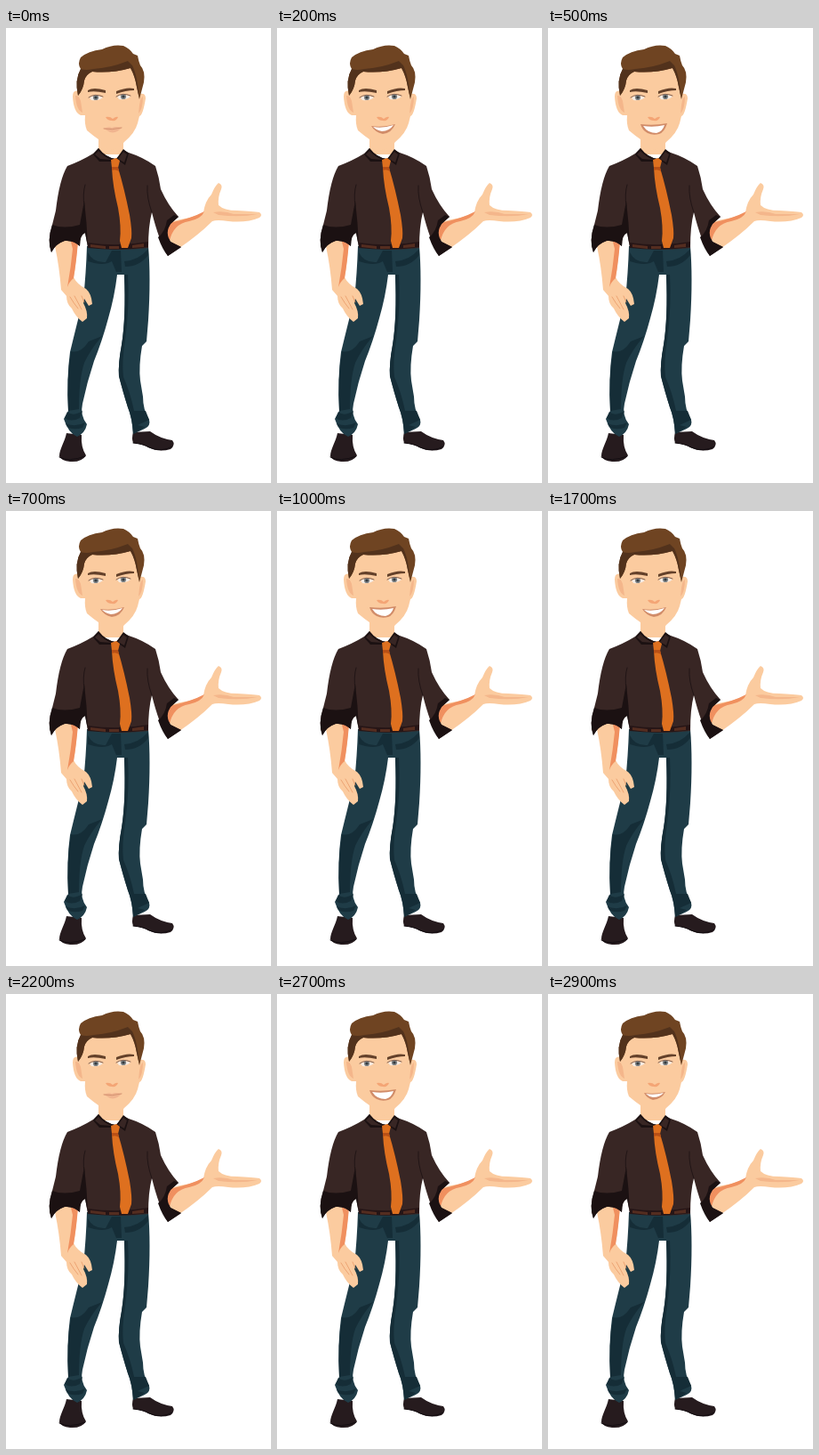
An HTML page that plays this animation: 298x511 px, repeating every 3 s.

```html
<!DOCTYPE html>
<html lang="en">
<head>
<meta charset="utf-8">
<title>Presenter talking</title>
<style>
html, body { margin: 0; width: 100%; height: 100%; overflow: hidden; background: #fff; }
svg { display: block; width: 298px; height: 511px; }
.skin { fill: #fbcb9f; }
.blush { fill: #f4b68b; }
.rim { fill: #f0905f; }
.shirt { fill: #382624; }
.dark { fill: #1b1112; }
.jeans { fill: #1f3c47; }
.shade { fill: #152d37; }
.shoe { fill: #261b1e; }
.hair { fill: #6f4422; }
.lip { fill: #d18c69; }
.teeth { fill: #fff; }
.line { fill: none; stroke-linecap: round; stroke-linejoin: round; }
.mouth { visibility: hidden; }
.mouth.on { visibility: visible; }
</style>
</head>
<body>
<svg viewBox="0 0 298 511">
  <g id="shoes">
    <path class="shoe" d="M68 455C66 465 60 473 60 481Q62 486 72 487Q85 488 90 480Q84 471 85 457Z"/>
    <path class="shoe" d="M143 454Q141 461 143 466Q154 467 160 471Q172 477 185 473Q191 468 187 463Q173 461 162 453Z"/>
    <path class="line" stroke="#120c10" d="M60 482Q70 488 89 481M143 466Q154 467 161 471Q175 477 187 470"/>
  </g>

  <g id="legs">
    <path class="jeans" d="M91 245L160 245Q163 280 160 328L158 352L153 357Q149 380 151 396L154 414Q154 429 161 440Q163 447 156 450L143 456Q142 438 137 426Q131 407 127 391Q126 377 130 356Q135 325 133 277H125Q122 302 115 326Q108 352 99 374Q91 398 86 422Q83 435 91 445Q89 455 80 459Q70 455 65 439L70 430Q68 393 72 364Q80 331 87 304Q90 276 91 245Z"/>
    <path class="shade" d="M92 252Q98 264 112 263L119 250H129L130 274H124L119 262Q110 268 92 262ZM160 255Q150 268 134 268L133 262Q149 261 160 248Z"/>
    <path class="shade" d="M108 346Q95 361 88 376Q82 394 82 428L70 430Q68 393 73 363Q84 366 93 352Z"/>
    <path class="shade" d="M133 277H137Q139 312 134 350Q130 374 132 392Q140 410 144 430L157 430L161 440L148 446L156 448L143 456Q142 438 137 426Q131 407 127 391Q126 377 130 356Q135 325 133 277Z"/>
    <path class="shade" d="M69 431Q75 437 86 430L83 438Q73 443 66 438ZM67 444Q78 449 89 443L86 449Q75 452 69 448Z"/>
  </g>

  <g id="left-arm">
    <path class="skin" d="M54 236L81 236Q79 263 76 280Q80 288 90 293Q96 298 97 310L93 312L88 304L87 309Q92 318 91 326L86 330Q78 324 74 315Q68 310 68 301L62 294Q60 268 55 245Z"/>
    <path class="rim" d="M73 240H81Q79 264 76 281Q71 285 69 291Q73 269 75 248Z"/>
    <path class="line" stroke="#e99a69" stroke-width=".8" d="M72 302Q76 309 81 315M77 301L85 316M85 301L88 308"/>
  </g>

  <g id="right-arm">
    <path class="skin" d="M180 219L196 215Q211 213 222 207Q224 194 231 187Q235 177 239 174Q244 176 242 181Q238 190 239 199Q245 205 260 205Q278 206 285 207Q289 210 285 213Q271 219 250 217Q237 215 232 217Q217 232 195 247Q180 242 180 219Z"/>
    <path class="rim" d="M184 219Q208 214 223 206Q220 214 206 217Q188 220 184 239Q178 230 184 219Z"/>
    <path class="blush" d="M233 207Q245 205 256 209L283 209Q264 213 239 210Z"/>
  </g>

  <path class="skin" d="M104 116H132V142H104Z"/>

  <g id="shirt">
    <path class="shirt" d="M104 135Q112 145 123 147Q130 143 132 137L138 140Q154 145 168 155Q172 167 174 181Q182 199 194 212L185 220Q178 230 185 240L197 246L182 256Q172 239 164 207Q160 222 160 247Q127 251 92 246L89 230Q83 232 83 245Q76 238 66 239Q56 242 51 252Q46 239 52 221L56 205Q60 170 69 155Q85 149 98 141Z"/>
    <path class="dark" d="M52 221Q65 226 83 221L88 194Q91 219 92 246L89 230Q83 232 83 245Q76 238 66 239Q56 242 51 252Q46 239 52 221Z"/>
    <path class="dark" d="M171 235Q179 229 181 216L189 210L194 212L185 220Q178 230 185 240L197 246L182 256Q176 249 171 235Z"/>
    <path class="dark" d="M104 135L98 142L105 150L119 150L123 147Q111 145 104 135ZM132 136L138 141L134 154L124 147Z"/>
    <path class="shirt" d="M104 138L100 142L106 147L119 148Q110 145 104 138ZM132 139L136 142L133 151L126 147Z"/>
    <path class="line" stroke="#211516" d="M88 200Q86 186 89 176M164 207Q158 190 159 177"/>
  </g>

  <g id="belt">
    <path fill="#261516" d="M92 241Q126 246 160 240V246Q127 251 92 247Z"/>
    <path fill="#542d20" d="M95 243L112 245V248L95 246ZM116 245L127 245V248L116 248ZM142 244L155 242V246L142 247Z"/>
  </g>

  <g id="tie">
    <path fill="#de701f" d="M118 148L124 146L128 149L126 157Q133 180 139 210Q142 228 141 236L137 247L130 247L128 239Q130 224 126 202Q120 178 119 157Z"/>
    <path fill="#b95016" d="M119 156H126L127 161Q123 158 119 160Z"/>
  </g>

  <g id="head">
    <path class="skin" d="M82 71Q75 69 75 77Q76 95 84 98L89 98Q88 108 91 115Q98 121 104 125Q111 137 120 137Q128 135 133 128Q145 118 148 107L150 99Q154 98 157 79Q157 73 151 74L144 40L91 42Z"/>
    <path class="blush" d="M78 76Q82 75 84 82L86 95Q79 92 78 76ZM154 77Q151 78 150 87L149 96Q154 91 154 77Z"/>
    <path class="hair" d="M81 76Q77 58 84 46Q80 40 84 33Q92 26 108 24Q120 18 132 20Q139 23 143 29L148 31Q149 37 151 42Q157 48 155 61L150 80L147 66Q145 54 140 45Q119 51 97 49Q90 52 88 59Q87 69 81 76Z"/>
    <path fill="#52321c" d="M84 46Q90 48 98 46Q117 45 137 37L142 42Q148 54 150 80L147 66Q145 54 140 45Q119 51 97 49Q90 52 88 59Q87 69 81 76Q77 58 84 46Z"/>
    <path fill="#64412a" d="M92 70Q98 66 112 70V73Q99 70 92 72ZM124 71Q136 66 144 68V70Q135 70 124 74Z"/>
    <g id="eye">
      <path fill="#f6ece4" d="M94 78Q100 74 109 78Q104 82 96 81Z"/>
      <circle cx="101" cy="78" r="3.1" fill="#7f8588"/>
      <circle cx="101" cy="78" r="1.6" fill="#343a3e"/>
      <path class="line" stroke="#806050" d="M93 78Q100 73 109 77"/>
    </g>
    <use href="#eye" x="31" y="-1"/>
    <path class="rim" opacity=".65" d="M112 100Q117 99 120 102Q124 99 126 100Q124 105 119 104Q114 104 112 100Z"/>
  </g>

  <g class="mouth on">
    <path fill="#f0b48f" d="M110 113Q116 110 119 112Q123 110 130 112Q124 119 117 117Z"/>
    <path class="line" stroke="#d49371" d="M110 113Q119 115 130 112"/>
  </g>
  <g class="mouth">
    <path class="lip" d="M108 111Q119 113 132 110Q128 118 118 119Q111 117 108 111Z"/>
    <path class="teeth" d="M110 112Q119 114 130 111Q126 116 118 116Q113 115 110 112Z"/>
  </g>
  <g class="mouth">
    <path class="lip" d="M106 110Q119 112 133 108Q129 118 119 119Q110 117 106 110Z"/>
    <path class="teeth" d="M108 111Q119 113 131 109Q126 116 118 116Q112 115 108 111Z"/>
  </g>
  <g class="mouth">
    <path class="lip" d="M104 108Q119 110 134 107Q131 117 125 119Q118 121 112 118Q106 115 104 108Z"/>
    <path class="teeth" d="M107 110Q119 112 131 109Q129 116 122 118Q112 118 107 110Z"/>
  </g>
</svg>
<script>
// One mouth shape per 100 ms: 0 closed, 1 narrow, 2 half open, 3 wide smile.
const speech = "012233222332101232222101233321";
const mouths = [...document.querySelectorAll(".mouth")];
let shown = 0;

function tick() {
  const step = Math.floor(performance.now() % 3000 / 100);
  const next = +speech[step];
  if (next !== shown) {
    mouths[shown].classList.remove("on");
    mouths[next].classList.add("on");
    shown = next;
  }
  requestAnimationFrame(tick);
}
tick();
</script>
</body>
</html>
```
